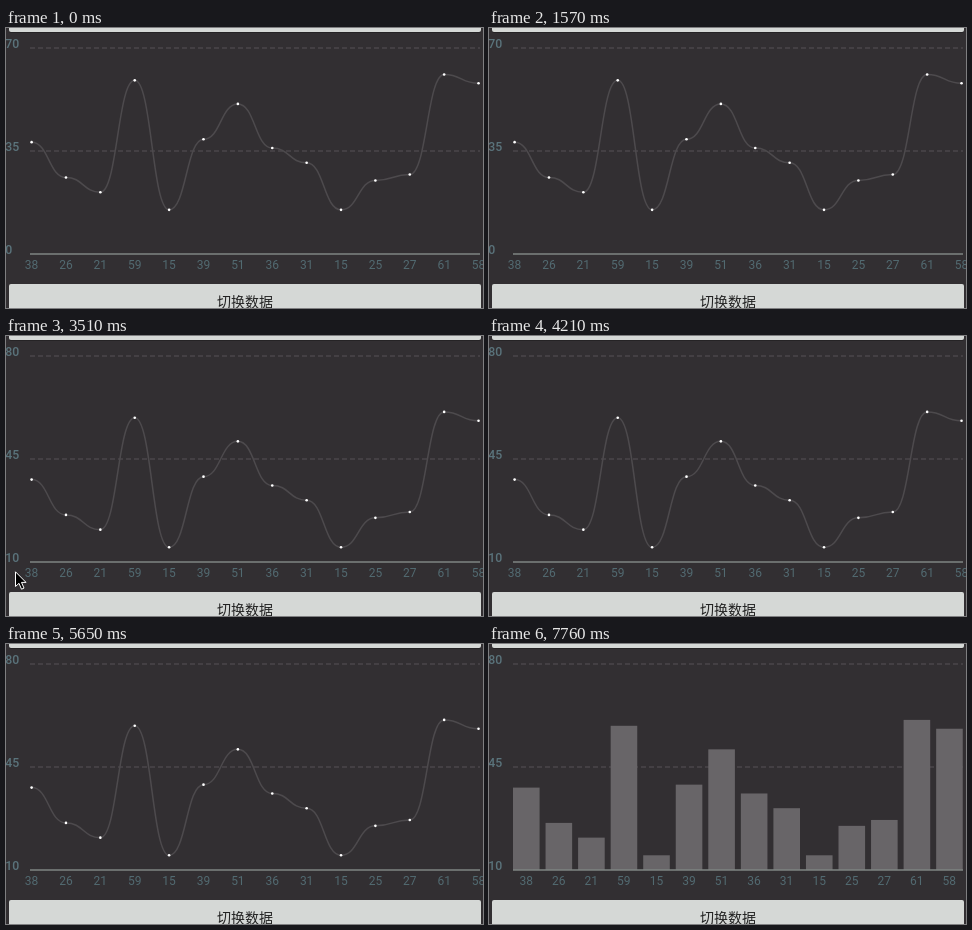
An HTML page for the animation above (8 s loop, 477x280 px).

```html
<!DOCTYPE html>
<html lang="zh">
<head>
<meta charset="utf-8">
<style>
html, body { margin: 0; width: 100%; height: 100%; overflow: hidden; background: #322f32; }
svg { display: block; }
.label { font: 12px Roboto, sans-serif; fill: #526a71; text-anchor: middle; }
.scale { font: 500 12.3px Roboto, sans-serif; fill: #5a737b; }
.button { fill: #d5d8d6; }
.caption { font: 500 14px "Noto Sans CJK SC", "Noto Sans CJK", sans-serif; fill: #222; text-anchor: middle; }
.grid { stroke: #565356; stroke-width: 1.2; stroke-dasharray: 5 3; }
.curve { fill: none; stroke: #4d4a4d; stroke-width: 1.5; }
.dot { fill: #fff; }
.bar { fill: #686568; }
</style>
</head>
<body>
<svg id="stage" width="477" height="280" viewBox="0 0 477 280"></svg>
<script>
const values = [38, 26, 21, 59, 15, 39, 51, 36, 31, 15, 25, 27, 61, 58];
const LOOP = 8000, TOP = 20, BOTTOM = 226, RANGE = 70;
const stage = document.getElementById('stage');

// [start, chart]
const charts = [
  [0, 'low'], [2690, 'high'], [4960, 'low'], [5650, 'high'],
  [6240, 'low'], [6670, 'high'], [7760, 'bars']
];
// [start, x, y]; no position means hidden
const moves = [
  [0], [500, 12, 271], [660, 5, 243], [810, 9, 232], [930, 12, 224],
  [1440, 12, 247], [1570],
  [3120, 6, 256], [3240, 2, 238], [3360, 0, 219],
  [3510, 9, 235], [3630, 12, 227], [4060]
];

function add(parent, tag, attrs, text) {
  const el = document.createElementNS('http://www.w3.org/2000/svg', tag);
  for (const key in attrs) el.setAttribute(key, attrs[key]);
  if (text !== undefined) el.textContent = text;
  return parent.appendChild(el);
}

const yOf = (v, min) => BOTTOM - (v - min) / RANGE * (BOTTOM - TOP);

function addScale(g, min) {
  [70, 35, 0].forEach((step, i) =>
    add(g, 'text', { class: 'scale', x: -0.7, y: TOP + i * 103 + 0.4 }, min + step));
}

function addLabels(g, xOf) {
  values.forEach((v, i) => add(g, 'text', { class: 'label', x: xOf(i), y: 241.3 }, v));
}

function lineChart(min) {
  const g = add(stage, 'g', {});
  const xOf = i => 25.6 + i * 34.38;
  let path = '';
  values.forEach((v, i) => {
    const x = xOf(i), y = yOf(v, min);
    if (!i) { path = `M${x} ${y}`; return; }
    const mid = x - 17.19;
    path += `C${mid} ${yOf(values[i - 1], min)} ${mid} ${y} ${x} ${y}`;
  });
  add(g, 'path', { class: 'curve', d: path });
  values.forEach((v, i) =>
    add(g, 'circle', { class: 'dot', cx: xOf(i), cy: yOf(v, min), r: 1.3 }));
  addScale(g, min);
  addLabels(g, xOf);
  return g;
}

function barChart(min) {
  const g = add(stage, 'g', {});
  const xOf = i => 24 + i * 32.55;
  values.forEach((v, i) => {
    const y = yOf(v, min);
    add(g, 'rect', { class: 'bar', x: xOf(i), y, width: 26.6, height: BOTTOM - y });
  });
  addScale(g, min);
  addLabels(g, i => xOf(i) + 13.2);
  return g;
}

add(stage, 'rect', { width: 477, height: 280, fill: '#322f32' });
add(stage, 'rect', { x: 3, y: -6, width: 472, height: 11, rx: 2, fill: '#252325' });
add(stage, 'rect', { class: 'button', x: 3, y: -8, width: 472, height: 12, rx: 2 });
for (const y of [20, 123])
  add(stage, 'line', { class: 'grid', x1: 24, x2: 474, y1: y, y2: y });

const views = { low: lineChart(0), high: lineChart(10), bars: barChart(10) };

add(stage, 'line', { x1: 24, x2: 474, y1: 226, y2: 226, stroke: '#7e8482', 'stroke-width': 1.5 });
add(stage, 'rect', { class: 'button', x: 3, y: 256, width: 472, height: 40, rx: 2 });
add(stage, 'text', { class: 'caption', x: 239, y: 279.3 }, '切换数据');

const pointer = add(stage, 'path', {
  d: 'M.5 .8V15.5L4 12.3L6.5 18.2L9 17.1L6.5 11.4H11Z',
  fill: '#000', stroke: '#fff', 'stroke-width': 1
});

const at = (table, t) => table.reduce((found, row) => row[0] <= t ? row : found);

function draw(now) {
  const t = now % LOOP;
  const current = at(charts, t)[1];
  for (const name in views)
    views[name].setAttribute('visibility', name === current ? 'visible' : 'hidden');
  const [, x, y] = at(moves, t);
  pointer.setAttribute('visibility', x === undefined ? 'hidden' : 'visible');
  if (x !== undefined) pointer.setAttribute('transform', `translate(${x} ${y})`);
}

let start;
function tick(now) {
  start ??= now;
  draw(now - start);
  requestAnimationFrame(tick);
}
draw(0);
requestAnimationFrame(tick);
</script>
</body>
</html>
```
